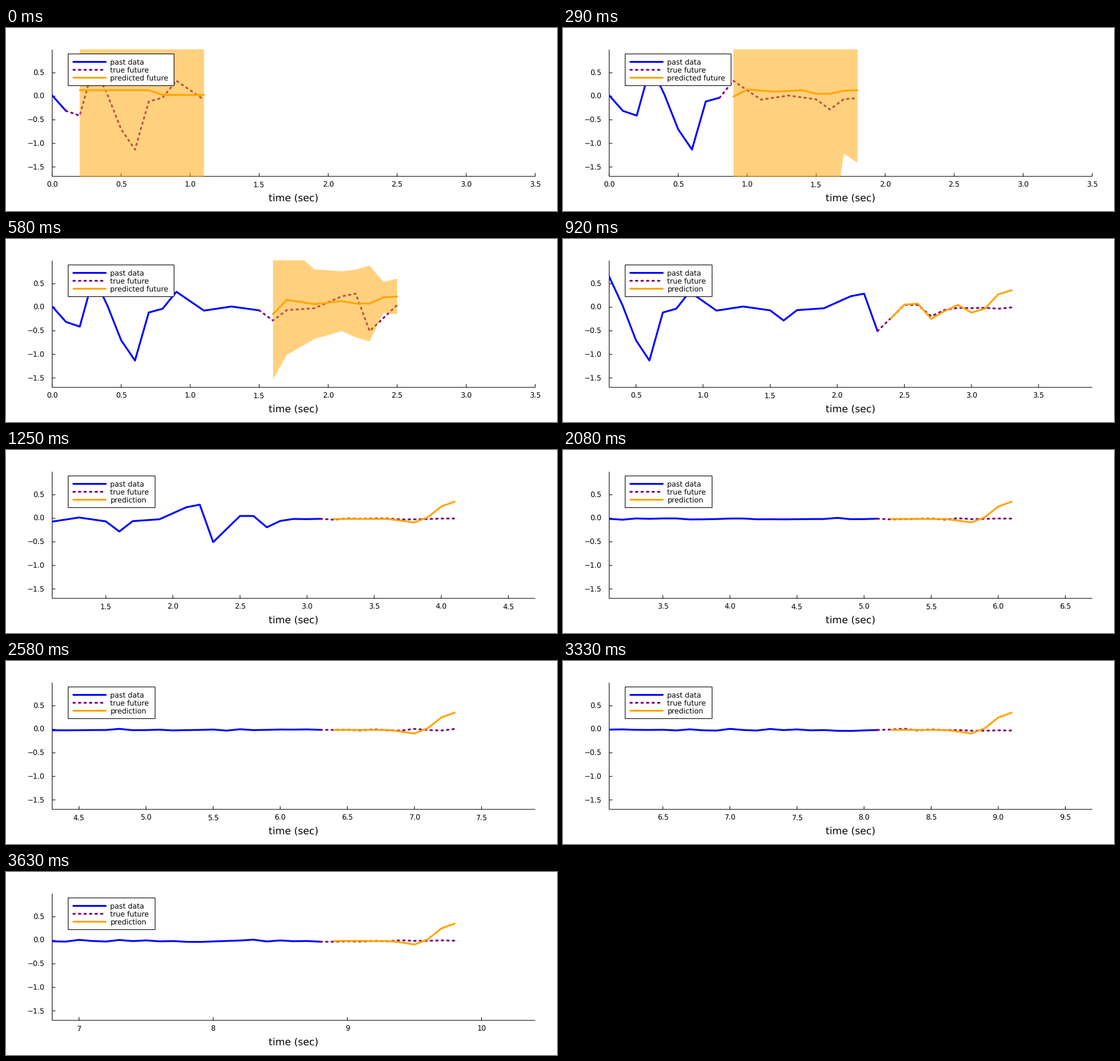
Animation, 900 px wide and 300 px high, one loop 3.68 s. Source, as a matplotlib script:

```python
import math

import matplotlib.pyplot as plt
import numpy as np
from matplotlib.animation import FuncAnimation
from matplotlib.patches import Polygon, Rectangle

W, H, DPI = 900, 300, 100
LEFT, RIGHT, TOP, BOTTOM = 75.4, 864.4, 35.6, 243.2
CLIP_TOP, CLIP_BOTTOM = 35, 244
Y_ZERO, Y_UNIT = 112, 77.2
STEPS, TICKS, TICK_MS = 88, 368, 10
SCROLL_FROM = 20   # all model times are in tenths of a second
TRAINED_AT = 15
SETTLED = 29
REST = -0.013

plt.rcParams.update({"font.family": "DejaVu Sans", "text.hinting": "none"})
fig = plt.figure(figsize=(W / DPI, H / DPI), dpi=DPI, facecolor="white")


def through(x, points):
    """Straight lines through (x, y) key points."""
    return np.interp(x, *zip(*points))


# Signal: a few large swings, then small noise around rest
time = np.arange(STEPS + 11)
swings = [(0, .02), (1, -.31), (2, -.41), (3, .65), (4, .04), (5, -.7),
          (6, -1.13), (7, -.11), (8, -.03), (9, .33), (11, -.07), (13, .017),
          (15, -.065), (16, -.28), (17, -.06), (19, -.02), (21, .235),
          (22, .29), (23, -.505), (25, .05), (26, .05), (27, -.19),
          (28, -.055), (29, REST)]
noise = np.random.default_rng(4).normal(0, 0.011, len(time))
signal = through(time, swings) + np.where(time > SETTLED, noise, 0)

# Ten-step forecasts: untrained, trained and steady
k = np.arange(1, 11)
untrained = np.where(k < 7, 0.13, 0.03)
trained = through(k, [(1, -.145), (2, .16), (4, .067), (6, .13),
                      (7, .08), (8, .08), (9, .21), (10, .23)])
spread = through(k, [(1, 1.385), (4, .74), (6, .635), (8, .805),
                     (9, .33), (10, .38)])
steady = through(k, [(5, REST), (7, -.088), (8, .026), (9, .25), (10, .355)])
echo = -0.2 * np.cos(2 * np.pi * (k - 6) / 3.4) * np.exp(-((k - 6) / 3) ** 2)


def steady_forecast(n):
    swing = np.where(n + k < SETTLED, signal[n + k] - REST, 0)
    return steady + swing + echo * signal[n]


def mix(a, b, u):
    return a + (b - a) * u


def forecast(n):
    if n >= SCROLL_FROM:
        return steady_forecast(n)
    if n <= TRAINED_AT:
        return mix(untrained, trained, (n - 1) / (TRAINED_AT - 1))
    u = (n - TRAINED_AT) / (SCROLL_FROM - TRAINED_AT)
    return mix(trained, steady_forecast(n), u)


def pt(px):
    return px * 72 / DPI


def page(z):
    ax = fig.add_axes([0, 0, 1, 1], zorder=z)
    ax.set(xlim=(0, W), ylim=(H, 0))
    ax.axis("off")
    return ax


def label(ax, x, y, s, ha="center", size=11.7):
    return ax.text(x, y, s, ha=ha, va="baseline", fontsize=pt(size))


def rule(x, y):
    return base.plot(x, y, color="black", lw=pt(1), solid_capstyle="butt",
                     snap=False)[0]


SOLID = dict(lw=pt(3), solid_capstyle="round", solid_joinstyle="round")
PAST = dict(color="blue", **SOLID)
TRUE = dict(color="purple", lw=pt(3), dash_capstyle="round",
            linestyle=(0, (2.6 / 3, 6.4 / 3)))
PRED = dict(color="orange", **SOLID)

# Axis lines, tick marks and labels
base = page(0)
rule([LEFT, LEFT], [TOP, BOTTOM])
rule([LEFT, RIGHT], [BOTTOM, BOTTOM])
for half in range(1, -4, -1):
    y = Y_ZERO - Y_UNIT * half / 2
    rule([LEFT, LEFT + 5.3], [y, y])
    label(base, 63, y + 4.3, f"{half / 2:.1f}".replace("-", "\u2212"), "right")
label(base, 470, 284, "time (sec)", size=16.1)
marks = [rule([0, 0], [BOTTOM - 5.3, BOTTOM]) for _ in range(8)]
names = [label(base, 0, 261.3, "") for _ in range(8)]

# Series, clipped to whole pixels so the band covers the bottom line
plot = fig.add_axes([LEFT / W, 1 - CLIP_BOTTOM / H, (RIGHT - LEFT) / W,
                     (CLIP_BOTTOM - CLIP_TOP) / H], zorder=1)
plot.axis("off")
plot.set_ylim((Y_ZERO - CLIP_BOTTOM) / Y_UNIT, (Y_ZERO - CLIP_TOP) / Y_UNIT)
past, = plot.plot([], [], zorder=2, **PAST)
true, = plot.plot([], [], zorder=3, **TRUE)
band = Polygon([[0, 0], [0, 0]], facecolor="orange", alpha=0.5, lw=0,
               snap=False, zorder=4)
plot.add_patch(band)
pred, = plot.plot([], [], zorder=5, **PRED)

# Legend
key = page(2)
box = Rectangle((101, 42), 173, 52, facecolor="white", edgecolor="black",
                lw=pt(1))
key.add_patch(box)
rows = []
for y, s, style in ((55.5, "past data", PAST), (68.5, "true future", TRUE),
                    (81.5, "", PRED)):
    key.plot([110, 163], [y, y], snap=False, **style)
    rows.append(label(key, 170.5, y + 4.3, s, "left"))


def set_window(n):
    scrolling = n >= SCROLL_FROM
    lo, hi = ((n - 20) / 10, (n + 16) / 10) if scrolling else (0, 3.5)
    plot.set_xlim(lo, hi)
    # Whole seconds are used when four of them fit
    whole = scrolling and math.ceil(lo - 1e-6) + 3 <= hi + 1e-6
    step = 1 if whole else 0.5
    first = math.ceil(lo / step - 1e-6)
    for i, (mark, name) in enumerate(zip(marks, names)):
        v = (first + i) * step
        shown = v <= hi + 1e-6
        mark.set_visible(shown)
        name.set_visible(shown)
        x = LEFT + (v - lo) / (hi - lo) * (RIGHT - LEFT)
        mark.set_xdata([x, x])
        name.set_x(x)
        name.set_text(f"{v:.0f}" if whole else f"{v:.1f}")


# 24 steps per second, rounded to hundredths of a second
starts = (np.arange(STEPS) * 25 + 3) // 6


def update(tick):
    n = int(np.searchsorted(starts, tick, side="right"))
    ahead, mean = (n + k) / 10, forecast(n)
    past.set_data(time[:n + 1] / 10, signal[:n + 1])
    true.set_data(time[n:n + 11] / 10, signal[n:n + 11])
    pred.set_data(ahead, mean)

    learning = n < SCROLL_FROM
    band.set_visible(learning)
    if learning:
        half = spread * math.exp((TRAINED_AT - n) * 0.2)
        band.set_xy(np.column_stack([np.r_[ahead, ahead[::-1]],
                                     np.r_[mean + half, (mean - half)[::-1]]]))
    rows[2].set_text("predicted future" if learning else "prediction")
    box.set_width(173 if learning else 142)
    set_window(n)
    return []


anim = FuncAnimation(fig, update, frames=TICKS, interval=TICK_MS,
                     init_func=lambda: update(0), repeat=True,
                     repeat_delay=0, blit=False)
plt.show()
```
